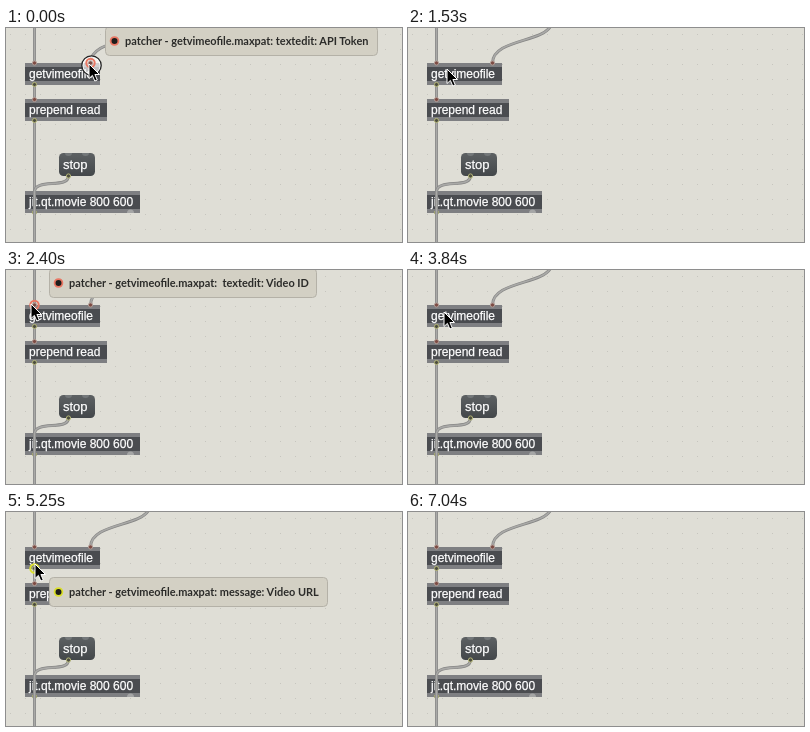
Animation of 396x214 px, one loop 7530 ms. Source, as an HTML page:

```html
<!DOCTYPE html>
<html lang="en">
<head>
<meta charset="utf-8">
<title>Patcher port hints</title>
<style>
  html, body { margin: 0; width: 100%; height: 100%; overflow: hidden; background: #dfded6; }
  svg { display: block; width: 396px; height: 214px; }
  text { white-space: pre; }
  .label { font: 12px "Liberation Sans", Arial, sans-serif; fill: #fff; stroke: #fff; stroke-width: .25; }
  .button { font-size: 13px; }
  .hint text { font: bold 10.95px Lato, sans-serif; fill: #2b2b29; }
  .wire path { fill: none; }
  .edge { stroke: #868685; stroke-width: 3; }
  .core { stroke: #a9a9a7; stroke-width: 1.6; }
</style>
</head>
<body>
<svg viewBox="0 0 396 214">
  <defs>
    <pattern id="grid" width="15" height="15" x="4" y="6" patternUnits="userSpaceOnUse">
      <rect width="1" height="1" fill="#c6c5be"/>
    </pattern>
    <linearGradient id="face" x2="0" y2="1">
      <stop stop-color="#5d6163"/>
      <stop offset="1" stop-color="#43474a"/>
    </linearGradient>
  </defs>
  <rect width="396" height="214" fill="#dfded6"/>
  <rect width="396" height="214" fill="url(#grid)"/>
  <g id="boxes"></g>
  <g id="wires"></g>
  <g id="click" transform="translate(85.5 37.5)">
    <circle r="9" fill="#fff" fill-opacity=".65" stroke="#fff" stroke-width="1.5"/>
    <circle r="9.7" fill="none" stroke="#222" stroke-width="1.3"/>
  </g>
  <g id="ports"></g>
  <g id="rings"></g>
  <g id="hints"></g>
  <path id="cursor" d="M0 0V14.5L3.4 11.4L5.8 17L8.3 16L5.9 10.5H10.5Z"
        fill="#000" stroke="#fff" stroke-linejoin="round"/>
</svg>
<script>
const LOOP = 7530, TICK = 50;
const RED = "#ea7763", YELLOW = "#dbe02c";
const $ = id => document.getElementById(id);

function add(parent, tag, attrs, text) {
  const node = document.createElementNS("http://www.w3.org/2000/svg", tag);
  for (const key in attrs) node.setAttribute(key, attrs[key]);
  if (text) node.textContent = text;
  parent.appendChild(node);
  return node;
}

function box(y, width, label) {
  const g = $("boxes");
  add(g, "rect", { x: 19, y, width, height: 22, fill: "#7e7f82" });
  add(g, "rect", { x: 19, y: y + 4, width, height: 14, fill: "#4a4c50" });
  add(g, "text", { x: 23, y: y + 15, class: "label" }, label);
}

function wire(d) {
  const g = add($("wires"), "g", { class: "wire" });
  add(g, "path", { d, class: "edge" });
  add(g, "path", { d, class: "core" });
}

function port(x, y, rim, core, parent = $("ports")) {
  add(parent, "circle", { cx: x, cy: y, r: 2.1, fill: core, stroke: rim });
}
const inlet = (x, y) => port(x, y, "#b29c95", "#7d4b43");
const outlet = (x, y, parent) => port(x, y, "#b4b677", "#4d4e40", parent);

function ring(x, y, color) {
  return add($("rings"), "circle", { cx: x, cy: y, r: 4.2, fill: "none", stroke: color, "stroke-width": 2 });
}

function hint(x, y, width, color, label) {
  const g = add($("hints"), "g", { class: "hint" });
  add(g, "rect", { x: x + .5, y: y + .5, width: width - 1, height: 29, rx: 4,
                   fill: "#d3d0c4", stroke: "#b4b1a7" });
  add(g, "circle", { cx: x + 9.5, cy: y + 15, r: 3.9, fill: "#1d1d1c", stroke: color, "stroke-width": 1.8 });
  add(g, "text", { x: x + 20, y: y + 19 }, label);
  return g;
}

box(35, 75, "getvimeofile");
box(71, 82, "prepend read");
box(163, 115, "jit.qt.movie 800 600");
outlet(28.5, 184.5, $("boxes"));
add($("boxes"), "path", { d: "M121 185a3.5 3.5 0 0 1 7 0z", fill: "#a5a6a6" });
add($("boxes"), "rect", { x: 53, y: 125, width: 36, height: 23, rx: 4.5, fill: "url(#face)" });
add($("boxes"), "text", { x: 57, y: 141, class: "label button" }, "stop");
for (const x of [62.5, 79.5])
  add($("boxes"), "path", { d: `M${x - 3.5} 125h7a3.5 3 0 0 1 -7 0z`, fill: "#74787a" });

wire("M28.5 -2V35");
wire("M28.5 57V71");
wire("M28.5 93V216");
wire("M84.5 35C84.5 12 133 14 142 -1");
wire("M62.5 148C62.5 161 28.5 150 28.5 164");

inlet(28.5, 35);
inlet(84.5, 35);
inlet(28.5, 71.5);
outlet(28.5, 56.5);
outlet(28.5, 92.5);
outlet(62.5, 148);

// [node, from, to], shown while from <= t < to
const file = "patcher - getvimeofile.maxpat: ";
const spans = [
  [hint(99, -2, 273, RED, file + "textedit: API Token"), 0, 1020],
  [hint(43, -2, 268, RED, file + " textedit: Video ID"), 2400, 3720],
  [hint(43, 65, 279, YELLOW, file + "message: Video URL"), 5250, 6800],
  [ring(84.5, 35, RED), 0, 1180],
  [ring(28.5, 35, RED), 1650, 3840],
  [ring(28.5, 56.5, YELLOW), 4530, 6860],
  [$("click"), 0, 60],
  [$("cursor"), 0, 7040]
];

// cursor tip: curved moves between resting points
const easeOut = p => 1 - (1 - p) ** 1.5;
const easeIn = p => p ** 1.5;
const token = [83, 36], video = [25, 34], url = [29, 52], exit = [70, 214];
const moves = [
  { from: 1020, to: 1870, a: token, bend: [54, 54], b: video, ease: easeOut },
  { from: 3720, to: 4650, a: video, bend: [57, 55], b: url, ease: easeOut },
  { from: 6800, to: 7040, a: url, bend: [32, 100], b: exit, ease: easeIn }
];

function tip(t) {
  const move = moves.findLast(m => t >= m.from);
  if (!move) return token;
  const { from, to, a, bend, b, ease } = move;
  const step = Math.floor((t - from) / TICK) + 1;
  const u = ease(Math.min(1, step * TICK / (to - from + TICK)));
  return a.map((v, i) => Math.round((1 - u) ** 2 * v + 2 * u * (1 - u) * bend[i] + u * u * b[i]));
}

const start = performance.now();

function draw() {
  const t = (performance.now() - start) % LOOP;
  for (const [node, from, to] of spans)
    node.setAttribute("visibility", t >= from && t < to ? "visible" : "hidden");
  $("cursor").setAttribute("transform", `translate(${tip(t)})`);
  requestAnimationFrame(draw);
}
draw();
</script>
</body>
</html>
```
